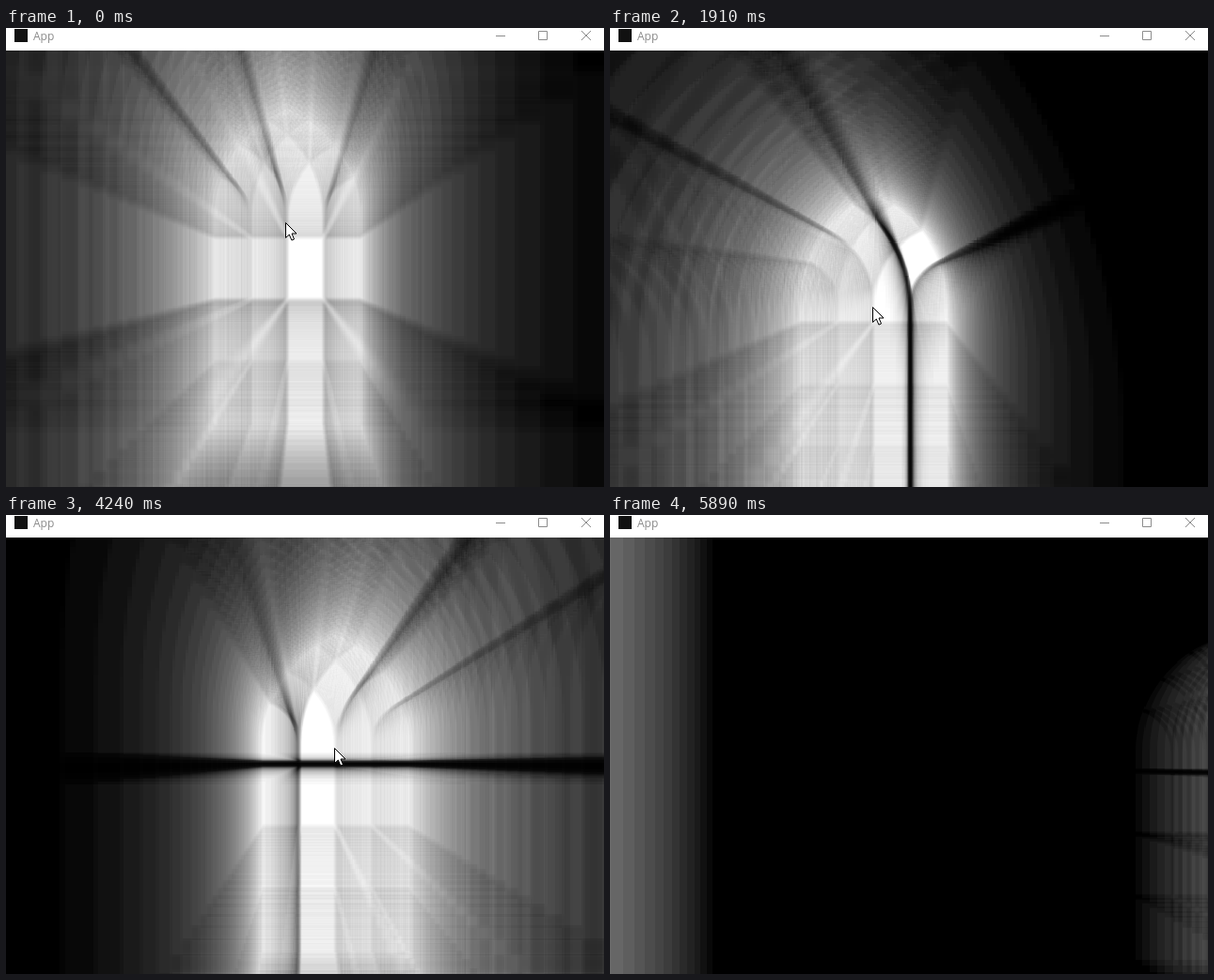
Recreate the animation shown at these times as an HTML page with a canvas. Size 636 by 489 pixels, loop 6860 ms.

```html
<!DOCTYPE html>
<html lang="en">
<head>
<meta charset="utf-8">
<title>App</title>
<style>
  html, body { margin: 0; width: 100%; height: 100%; overflow: hidden; background: #000; }
  canvas, svg, header { position: absolute; left: 0; top: 0; display: block; }
  header { width: 636px; height: 24px; background: #fff; }
  header span { position: absolute; left: 29px; top: 1px; font: 12px/16px "Open Sans", "Noto Sans", sans-serif; color: #8c8c8c; }
</style>
</head>
<body>
<canvas id="view" width="636" height="489"></canvas>
<svg id="cursor" width="14" height="21" viewBox="-.5 -.5 14 21">
  <path d="M0 0V16L3.8 12.6L6.4 18.6L9 17.5L6.5 11.5H11.5Z" fill="#fff" stroke="#000"/>
</svg>
<header>
  <svg width="636" height="24" fill="none" stroke="#8c8c8c">
    <rect x="9" y="1" width="14" height="14" fill="#111" stroke="none"/>
    <path d="M521 8.5H531M566.5 3.5H575.5V12.5H566.5ZM612 3L622 13M622 3L612 13"/>
  </svg>
  <span>App</span>
</header>
<script>
const W = 636, H = 489, TOP = 24;
const LOOP = 6860, TICK = 136.7, LAST_DRAG = 39, LEAP = 5770, GONE = 5890;
const CX = 318.5, CY = 264;                      // centre of the light rays
const SAMPLES = 30, NEAR = 0.986, STEP = 0.028;
const PITCH = 38.5, HALF = 2 * PITCH, ROW = 66;  // panes of the window
const ARCH = 125, SPRING = 20, FLARE = 8;        // arch radius, spring height, tracery overhang

// tick, x of the middle mullion, y of the upper crossbar
const PATH = [
  [0, 299.3, 223.5], [9, 279.5, 290.5], [14, 284, 318], [17, 312, 323], [24, 346, 312],
  [31, 350.5, 265], [35, 333.5, 235.5], [39, 338, 231], [40, 470, 254], [41, 633, 273]
];

// smooth curve through the path points
function position(tick) {
  const last = PATH.length - 1;
  const i = Math.min(PATH.findLastIndex(k => k[0] <= tick), last - 1);
  const a = PATH[i], b = PATH[i + 1], span = b[0] - a[0], u = (tick - a[0]) / span;
  const slope = (j, c) => {
    const p = PATH[Math.max(j - 1, 0)], n = PATH[Math.min(j + 1, last)];
    return (n[c] - p[c]) / (n[0] - p[0]) * span;
  };
  return [1, 2].map(c => {
    const d = b[c] - a[c], m = slope(i, c), n = slope(i + 1, c);
    return a[c] + u * (m + u * (3 * d - 2 * m - n + u * (m + n - 2 * d)));
  });
}

const view = document.getElementById('view').getContext('2d');
const cursor = document.getElementById('cursor');
const scene = Object.assign(document.createElement('canvas'), { width: W, height: H })
  .getContext('2d', { willReadFrequently: true });
const out = view.createImageData(W, H);
out.data.fill(255);
const light = new Uint8Array(W * H), sum = new Uint16Array(W);

const scales = Array.from({ length: SAMPLES }, (_, i) => NEAR - STEP * i);
const columns = scales.map(s => Int16Array.from({ length: W }, (_, x) => CX + (x + 0.5 - CX) * s));

// layered strokes give a bar with soft edges
function softStroke(path, width) {
  for (const k of [1, 2, 3]) {
    scene.lineWidth = width * k / 3;
    scene.stroke(path);
  }
}

// black wall with a four-light window; all arcs of one side share a centre
function drawWindow(x, y) {
  const g = scene, spring = y - SPRING, bottom = y + 3 * ROW;
  g.fillStyle = '#fff';
  g.fillRect(0, 0, W, H);
  g.fillStyle = '#000';
  g.fillRect(x - 521, 0, 1042, H);

  const outline = new Path2D(), tracery = new Path2D(), crossbars = new Path2D();
  const reach = Math.acos((ARCH - HALF) / ARCH);
  outline.moveTo(x - HALF, bottom);
  outline.arc(x - HALF + ARCH, spring, ARCH, Math.PI, Math.PI + reach);
  outline.arc(x + HALF - ARCH, spring, ARCH, -reach, 0);
  outline.lineTo(x + HALF, bottom);
  outline.closePath();

  for (let i = 1; i < 4; i++) {
    const m = x - HALF + i * PITCH, left = x - HALF - FLARE, right = x + HALF + FLARE;
    tracery.moveTo(m, bottom);
    tracery.arc(right, spring, right - m, Math.PI, Math.PI * 1.5);
    tracery.moveTo(m, spring);
    tracery.arc(left, spring, m - left, 0, -Math.PI / 2, true);
    crossbars.rect(x - HALF - 9, y + (i - 1) * ROW, 2 * HALF + 18, 0);
  }

  g.save();
  g.fillStyle = '#fff';
  g.fill(outline);
  g.clip(outline);
  g.strokeStyle = 'rgba(0, 0, 0, .7)';
  softStroke(tracery, 4.5);
  softStroke(crossbars, 6);
  g.restore();
}

// every pixel averages samples on its way to the centre
function castRays() {
  const src = scene.getImageData(0, 0, W, H).data, dst = out.data;
  for (let i = 0; i < light.length; i++) light[i] = src[i * 4];
  for (let y = TOP; y < H; y++) {
    sum.fill(0);
    for (let i = 0; i < SAMPLES; i++) {
      const row = Math.floor(CY + (y + 0.5 - CY) * scales[i]) * W, col = columns[i];
      for (let x = 0; x < W; x++) sum[x] += light[row + col[x]];
    }
    for (let x = 0, p = y * W * 4; x < W; x++, p += 4)
      dst[p] = dst[p + 1] = dst[p + 2] = sum[x] / SAMPLES;
  }
  view.putImageData(out, 0, 0);
}

let shown = -1;
function frame() {
  const now = performance.now() % LOOP;
  const tick = now >= GONE ? LAST_DRAG + 2
    : now >= LEAP ? LAST_DRAG + 1
    : Math.min(LAST_DRAG, Math.floor(now / TICK));
  if (tick !== shown) {
    shown = tick;
    const [x, y] = position(tick);
    drawWindow(x, y);
    castRays();
    cursor.style.transform = `translate(${Math.round(x - 2)}px, ${Math.round(y - 17)}px)`;
    cursor.style.visibility = now < GONE ? 'visible' : 'hidden';
  }
  requestAnimationFrame(frame);
}
frame();
</script>
</body>
</html>
```
